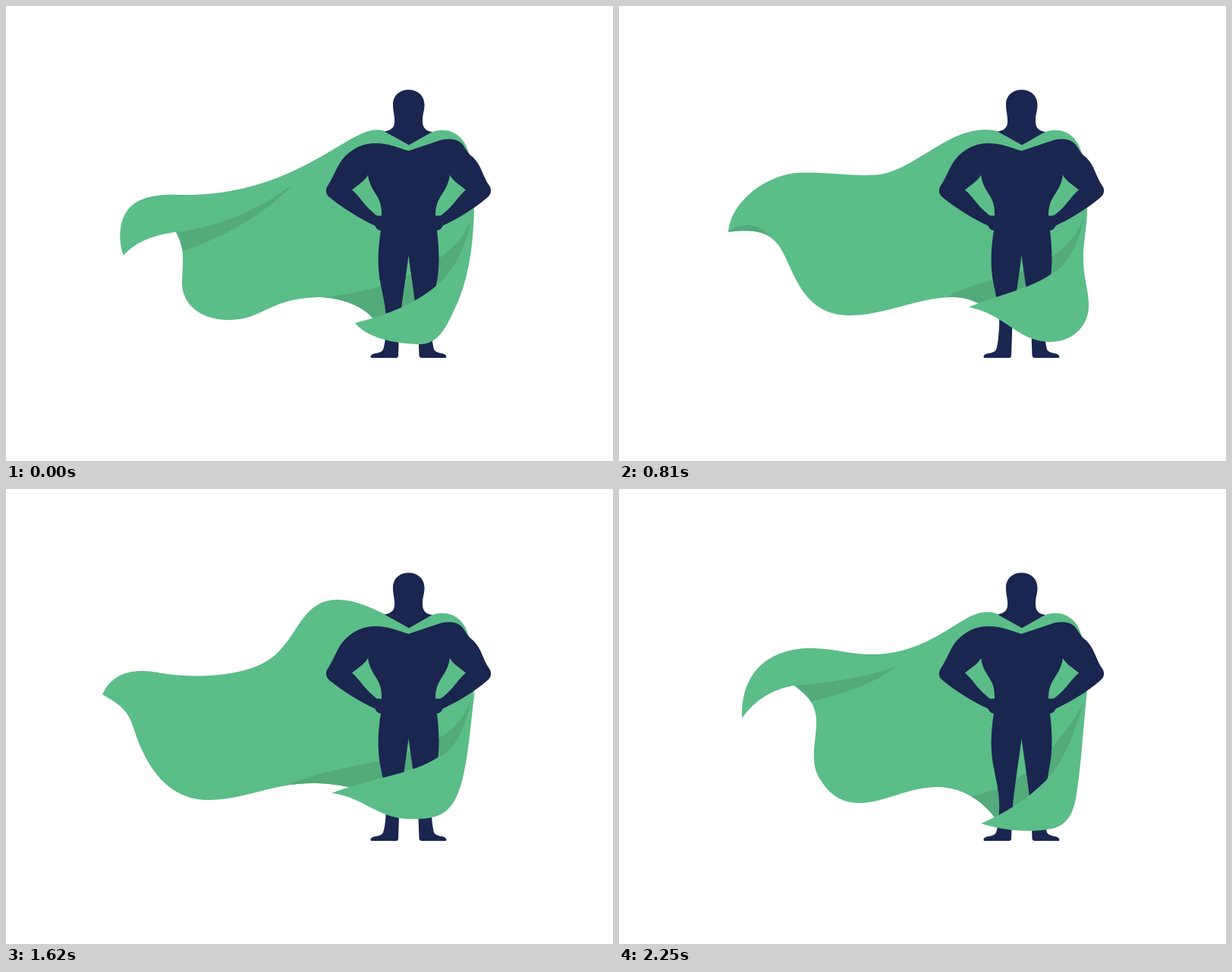
Recreate the animation shown at these times as an HTML page. Size 800 by 600 pixels, loop 2340 ms.

```html
<!DOCTYPE html>
<html lang="en">
<head>
<meta charset="utf-8">
<title>Caped figure</title>
<style>
html, body { margin: 0; width: 100%; height: 100%; overflow: hidden; background: #fff; }
svg { display: block; width: 100%; height: 100%; }
</style>
</head>
<body>
<svg viewBox="0 0 800 600">
  <clipPath id="clip"><path id="clipShape"/></clipPath>
  <path id="cape" fill="#5bbd87"/>
  <g clip-path="url(#clip)" fill="#53aa7a">
    <path id="shadeA"/>
    <path id="shadeB"/>
    <path id="glint" fill="#66d496"/>
    <path id="lining"/>
  </g>
  <g fill="#1a2650">
    <path d="M499,165.5C508,164 513,160 512,149C511.5,141 510,138 510,130C510,118 519,110.5 530.5,110.5C542,110.5 551.5,118 551.5,130C551.5,138 549.5,141 549,149C548.5,160 552,164.5 562,166L531,183.5Z"/>
    <path fill-rule="evenodd" d="M530.5,191C515,186 503,181 487,181C470,181 457,188 447,198C437,208 433,223 424,237C421,241 421,247 425,251C440,264 465,280 486,289.5C488,292 489,296 494,296C490,320 489,345 494,368C499,393 502,405 501,425C500,434 500,445 497,453C493,460 481,456 480.5,463Q481,464 482,464H514Q517,464 517,461L518,433C518.5,410 526.5,362 530.5,329C535,362 542.5,410 543.5,433L544.5,461Q545,464 548,464H579Q580.5,464 580.5,463C580,456 569,460 564,453C562,445 561,434 560.5,425C560,405 563,393 567,368C572,345 571,320 568,296C573,296 574,292 576,289.5C597,280 622,264 636,251C640,247 640,241 637,237C628,224 627,211 616,200C609,195 607,190 602,183C597,176 586,174 574,176.5ZM477,223C472,232 462,237 456,242.5C464,249 470,259 479,268C483,271 486,275 489,276.5L495,276.5C495.5,262 492,255 486,246C481,238 478,231 477,223ZM585,223C590,232 600,237 606,242.5C598,249 592,259 583,268C579,271 576,275 572,276.5L566,276.5C566,262 570,255 576,246C581,238 584,231 585,223Z"/>
  </g>
  <path id="fold" fill="#5bbd87"/>
</svg>
<script>
const LOOP = 2340, STEP = 90, N = 300;
// A shape shrunk to one point, made of the given number of curves.
const dot = (x, y, curves = 2) => `M${x},${y}` + `C${x},${y} ${x},${y} ${x},${y}`.repeat(curves) + 'Z';

// top, hem: cape edges either side of the loose corner; fold, sweep: front flap; rim: edge of the lining.
// topWarp, hemWarp: places along an edge that belong together in this pose and the next.
const POSES = [
  {
    at: 0, bend: [-20, -8],
    topWarp: [[.05, .15], [.68, .78]], hemWarp: [[.17, .1], [.53, .32], [.82, .45]],
    top: 'M499,165C490,162 483,163 472,167C431,183 359,252 228,249C185,247 158,258 152,288C149,300 150,318 155,329',
    hem: 'M155,329C170,311 195,302 224,298C230,309 233,320 233,333C233,350 232,355 232,366C233,398 262,414 293,414C340,414 345,385 415,384C450,386 475,400 484,413',
    fold: 'M613,279C607,318 591,349 567,369C537,394 500,408 460,418',
    sweep: 'M460,418C472,433 500,445 545,446C573,446 583,416 592,398C609,362 616,318 617,266',
    rim: 'M613,279C603,312 577,332 540,350C505,368 460,381 415,384',
    shadeA: 'M224,298C280,292 335,268 378,235C345,272 290,304 233,323Z',
    shadeB: dot(233, 370), glint: dot(155, 329, 3)
  },
  {
    at: 450, bend: [0, -5],
    topWarp: [[.28, .69], [.85, .95]], hemWarp: [[.45, .15], [.86, .55]],
    top: 'M499,165C494,163 488,163.5 484,164C430,158 355,184 300,228C262,255 215,274 130,269',
    hem: 'M130,269C150,292 185,362 224,359C240,358 246,351 270,351C300,351 325,368 341,395C355,418 368,437 405,438C428,438 445,435 463,431',
    fold: 'M613,279C600,312 592,345 569,360C545,376 515,384 498,393C480,402 462,420 458,451',
    sweep: 'M458,451C480,437 510,434 535,431C565,427 585,415 593,397C608,365 616,318 617,266',
    rim: 'M613,279C600,308 585,322 565,334C530,355 515,360 494,367C460,378 435,400 422,437',
    shadeA: 'M262,349C305,340 350,322 381,298C360,322 330,345 297,356Z',
    shadeB: dot(130, 269), glint: dot(130, 269, 3)
  },
  {
    at: 810, bend: [0, -26],
    topWarp: [[.08, .52], [.42, .7], [.69, .82]], hemWarp: [[.55, .22], [.9, .35]],
    top: 'M499,165C490,163 480,162 466,165C425,173 385,215 345,222C310,226 275,218 235,220C190,224 147,260 144,298',
    hem: 'M144,298C176,294 195,297 209,314C230,340 236,408 304,408C350,408 395,384 440,384C453,384 463,387 471,391',
    fold: 'M613,279C605,315 592,342 569,354C541,373 500,381 461,397',
    sweep: 'M461,397C510,407 523,441 567,443C600,443 620,420 619,393C618,370 611,355 612,325C613,305 617,290 617,266',
    rim: 'M613,279C600,308 585,322 565,334C540,348 515,356 491,362C470,367 450,374 434,383',
    shadeA: dot(225, 360),
    shadeB: 'M144,298C155,287 182,283 198,303C182,296 165,295 144,298Z',
    glint: dot(144, 298, 3)
  },
  {
    at: 1260, bend: [0, 0],
    topWarp: [[.05, .15], [.33, .63], [.52, .84]], hemWarp: [[.25, .14], [.8, .52]],
    top: 'M499,165C489,158 477,158 464,165C440,180 415,203 377,203C345,203 325,195 298,195C270,195 268,210 256,222C240,240 222,248 192,247C170,256 164,290 165,318',
    hem: 'M165,318C170,345 195,359 228,359C240,360 255,362 273,369C300,380 308,439 378,439C405,438 425,434 443,429',
    fold: 'M613,279C605,320 591,351 567,368C530,392 490,408 431,423',
    sweep: 'M431,423C460,436 510,438 545,438C575,438 590,430 595,407C600,385 607,375 610,350C614,325 617,300 617,266',
    rim: 'M613,279C600,312 575,335 540,356C510,374 485,385 455,394C420,405 392,418 386,439',
    shadeA: 'M240,360C300,345 355,325 417,311C375,325 330,357 274,369Z',
    shadeB: dot(165, 318),
    glint: 'M190,245C182,258 192,273 205,280C187,290 168,299 165,318C150,300 150,255 190,245Z'
  },
  {
    at: 1620, bend: [0, 0],
    topWarp: [[.15, .45], [.63, .68], [.83, .85]], hemWarp: [[.52, .36], [.88, .48]],
    top: 'M499,165C478,155 458,146 437,146C385,146 385,205 340,229C305,248 245,250 200,242C165,236 140,243 127,271',
    hem: 'M127,271C150,284 161,292 168,315C180,352 205,410 266,410C315,410 350,388 405,388C422,388 437,390 451,393',
    fold: 'M613,279C604,318 592,345 569,354C535,376 490,379 429,401',
    sweep: 'M429,401C470,406 490,434 530,435C575,437 590,425 601,385C610,350 612,310 618,266',
    rim: 'M613,279C600,308 585,322 565,331C540,345 515,354 491,359C450,367 410,375 375,388',
    shadeA: dot(160, 297), shadeB: dot(255, 409), glint: dot(127, 271, 3)
  },
  {
    at: 1980, bend: [-8, 0],
    topWarp: [[.25, .44], [.46, .64], [.67, .8]], hemWarp: [[.11, .17], [.75, .62]],
    top: 'M499,165C489,162 476,163 462,168C420,186 375,188 330,176C275,160 265,202 230,222C190,244 135,247 130,310',
    hem: 'M130,310C140,300 153,295 169,290C178,293 187,299 194,311C205,330 215,352 235,355C262,357 275,359 297,374C313,385 308,399 326,413C345,428 385,434 422,437C432,437 442,436 451,436',
    fold: 'M613,279C600,315 592,345 568,360C545,374 520,379 497,387C470,396 455,413 449,442',
    sweep: 'M449,442C480,436 510,433 535,430C568,426 592,417 602,398C613,370 616,320 617,266',
    rim: 'M613,279C600,308 585,322 565,334C530,353 515,358 494,366C460,378 435,400 422,438',
    shadeA: 'M169,290C215,278 258,250 287,209C265,260 235,292 194,311Z',
    shadeB: 'M245,355C290,355 335,353 368,346C350,359 315,364 287,367Z',
    glint: dot(130, 310, 3)
  },
  {
    at: 2250, bend: [0, 0], topWarp: [], hemWarp: [],
    top: 'M499,165C488,160 476,162 463,168C435,182 395,218 334,218C300,218 285,210 252,210C205,210 160,235 162,302',
    hem: 'M162,302C180,278 200,265 231,259C248,272 259,283 260,304C261,330 250,358 264,381C275,400 290,414 317,414C350,414 380,393 421,393C455,394 480,413 495,433',
    fold: 'M613,279C600,325 585,360 565,382C540,408 510,427 477,441',
    sweep: 'M477,441C505,450 540,454 570,448C595,443 601,420 604,395C610,355 612,310 617,266',
    rim: 'M613,279C600,308 570,345 540,371C515,390 490,400 465,405',
    shadeA: 'M231,259C285,255 330,247 365,234C340,255 295,271 252,280Z',
    shadeB: dot(258, 350), glint: dot(162, 302, 3)
  }
];
const EDGES = ['top', 'hem', 'fold', 'sweep', 'rim'];
const PATCHES = ['shadeA', 'shadeB', 'glint'];

const lerp = (a, b, t) => a + (b - a) * t;
const line = pts => pts.map(p => p[0].toFixed(2) + ',' + p[1].toFixed(2)).join('L');
const setPath = (id, d) => document.getElementById(id).setAttribute('d', d);

function sample(d) {
  const path = document.createElementNS('http://www.w3.org/2000/svg', 'path');
  path.setAttribute('d', d);
  const len = path.getTotalLength();
  return Array.from({ length: N + 1 }, (_, i) => {
    const p = path.getPointAtLength(len * i / N);
    return [p.x, p.y];
  });
}
for (const pose of POSES) {
  pose.pts = Object.fromEntries(EDGES.map(e => [e, sample(pose[e])]));
}

function pointAt(pts, u) {
  const x = Math.min(Math.max(u, 0), 1) * N, i = Math.min(Math.floor(x), N - 1);
  return [0, 1].map(k => lerp(pts[i][k], pts[i + 1][k], x - i));
}

function blendEdge(a, b, t, warp = [], shift = () => [0, 0]) {
  const knots = [[0, 0], ...warp, [1, 1]];
  const mid = k => (k[0] + k[1]) / 2;
  const out = [];
  for (let i = 0, k = 0; i <= N; i++) {
    const s = i / N;
    while (k < knots.length - 2 && s > mid(knots[k + 1])) k++;
    const p = knots[k], q = knots[k + 1], f = (s - mid(p)) / (mid(q) - mid(p));
    const A = pointAt(a, lerp(p[0], q[0], f)), B = pointAt(b, lerp(p[1], q[1], f));
    const [dx, dy] = shift(s);
    out.push([lerp(A[0], B[0], t) + dx, lerp(A[1], B[1], t) + dy]);
  }
  return out;
}

function blendPath(a, b, t) {
  const nums = b.match(/[\d.]+/g);
  let i = 0;
  return a.replace(/[\d.]+/g, n => lerp(+n, +nums[i++], t).toFixed(2));
}

function draw(time) {
  let i = POSES.length - 1;
  while (POSES[i].at > time) i--;
  const a = POSES[i], b = POSES[(i + 1) % POSES.length];
  const t = (time - a.at) / ((b.at || LOOP) - a.at);
  const swing = Math.sin(Math.PI * t), [dx, dy] = a.bend;
  const edge = (name, warp, shift) => blendEdge(a.pts[name], b.pts[name], t, warp, shift);

  const top = edge('top', a.topWarp, s => [dx * swing * s * s, dy * swing * Math.sin(Math.PI * s)]);
  const hem = edge('hem', a.hemWarp, s => [dx * swing * (1 - s) ** 2, 0]);
  const fold = edge('fold'), sweep = edge('sweep'), rim = edge('rim');

  // The right side runs on beneath the flap.
  const cape = 'M' + line(top) + 'L' + line(hem) +
    'L550,412L600,345L610,315L614,280L617,266L610,195C605,172 586,158 562,166L531,183.5Z';
  setPath('cape', cape);
  setPath('clipShape', cape);
  for (const id of PATCHES) setPath(id, blendPath(a[id], b[id], t));

  const [x, y] = fold[N];
  setPath('lining', 'M' + line(rim) + `L${x + 15},${y + 25}L` + line(fold.slice().reverse()) + 'Z');
  setPath('fold', 'M' + line(fold) + 'L' + line(sweep) + 'Z');
}

let shown = -1;
const start = performance.now();
function tick() {
  const time = Math.floor((performance.now() - start) % LOOP / STEP) * STEP;
  if (time !== shown) draw(shown = time);
  requestAnimationFrame(tick);
}
tick();
</script>
</body>
</html>
```
